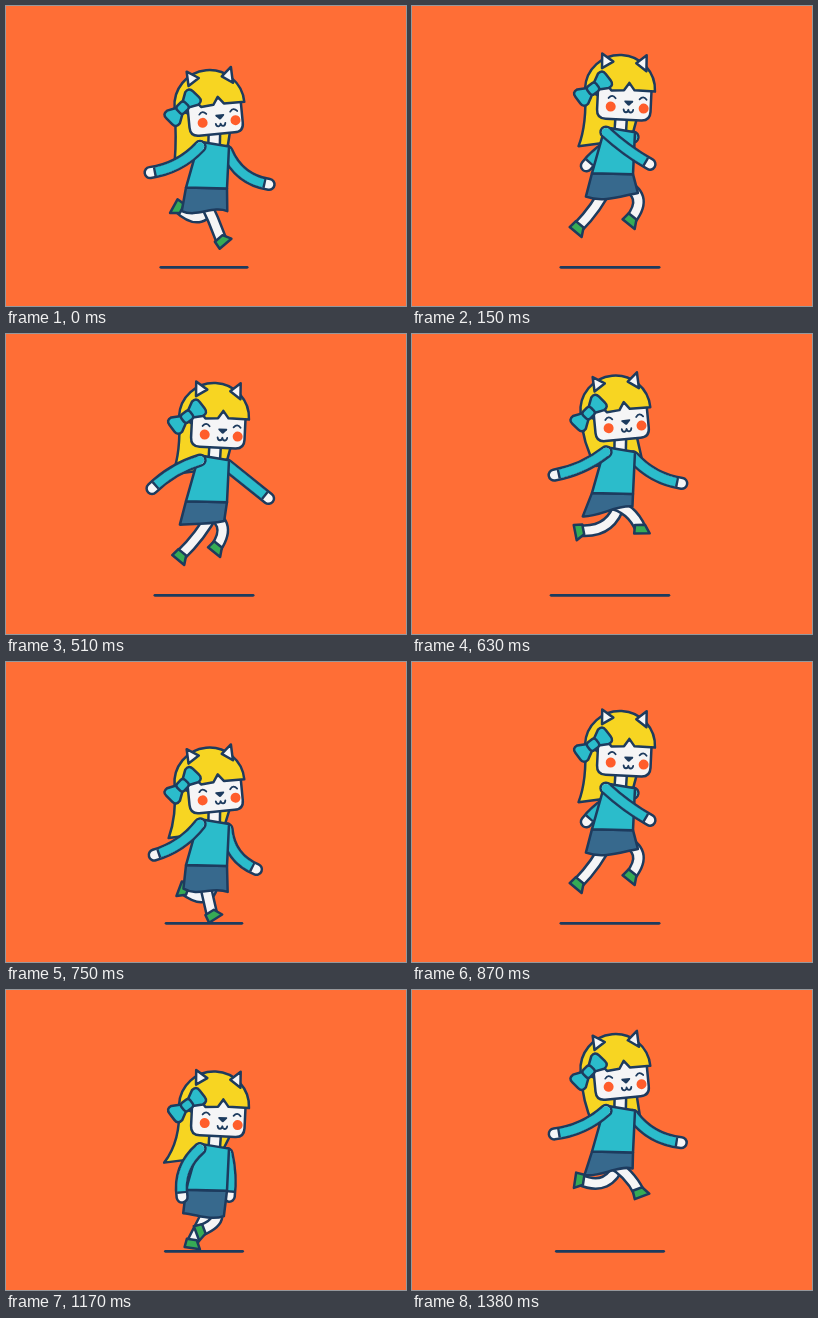
These frames come from a looping animation (400x300 px, 1440 ms). An HTML page:

```html
<!DOCTYPE html>
<html lang="en">
<head>
<meta charset="utf-8">
<title>Skipping</title>
<style>
html, body { margin: 0; width: 100%; height: 100%; overflow: hidden; background: #ff6e36; }
svg { display: block; width: 100vw; height: 100vh; }
.o { stroke: #1d3b5e; stroke-width: 2.5; stroke-linejoin: round; stroke-linecap: round; }
.n { fill: none; }
.y { fill: #f7d522; }
.t { fill: #2bbccb; }
.w { fill: #f5f5f6; }
.s { fill: #37698d; }
.g { fill: #36ab55; }
.c { fill: #ff5d2b; }
.d { fill: #1d3b5e; }
</style>
</head>
<body>
<svg viewBox="0 0 400 300">
  <rect width="400" height="300" fill="#ff6e36"/>
  <path id="ground" class="o n" style="stroke-width:2.8"/>
  <path id="hair" class="o y"/>
  <g id="armB"></g>
  <g id="legB"></g>
  <g id="legA"></g>
  <g id="neck"></g>
  <path id="skirt" class="o s"/>
  <path id="torso" class="o t"/>
  <g id="armA"></g>
  <g id="head">
    <path class="o w" d="M-26.5-38V-11.5Q-26.5-2.5-17.5-2.5H18Q27-2.5 27-11.5V-38Z"/>
    <path class="o y" d="M-39.5-32A35 35 0 0 1 30.5-32L10-32.3 4.5-39.5-.5-32-13-31-18-37-27-33Z"/>
    <path class="o w" d="M-24-67.5L-12.5-60-23.5-53ZM20.5-68L10.5-59.5 21-52Z"/>
    <g class="c"><circle cx="-13" cy="-15" r="5"/><circle cx="20" cy="-14.5" r="5"/></g>
    <path class="o n" style="stroke-width:1.8" d="M-15.5-23.5Q-12-28-8.5-23.5M15.5-23.5Q19-28 22.5-23.5M0-12.8Q.4-10 2.4-10T4.8-12.6Q5.2-10 7.2-10T9.6-12.8"/>
    <path class="d" d="M.8-21.8H8.8Q9.8-21.3 9-20.3L5.7-17Q4.8-16.4 3.9-17L.6-20.3Q-.2-21.3 .8-21.8Z"/>
    <g class="o t" transform="translate(-31.5 -32) rotate(-40)">
      <path d="M4-4L13-9Q19-10 19-4V4Q19 10 13 9L4 4ZM-4-4L-13-9Q-19-10-19-4V4Q-19 10-13 9L-4 4Z"/>
      <rect x="-5.5" y="-5" width="11" height="10" rx="3"/>
    </g>
  </g>
</svg>
<script>
const CYCLE = 720, HOP = 360, LOOP = 1440, STEP = 30, LAST = 1380;
const INK = '#1d3b5e', TEAL = '#2bbccb', WHITE = '#f5f5f6';
const X = 180;

const el = id => document.getElementById(id);
const cos = a => Math.cos(a * Math.PI / 180);
const sin = a => Math.sin(a * Math.PI / 180);
const mix = (p, q, u) => [p[0] + (q[0] - p[0]) * u, p[1] + (q[1] - p[1]) * u];
const ease = u => { u = Math.max(0, Math.min(1, u)); return u * u * (3 - 2 * u); };
const curve = (s, c, e) => `M${s}Q${c} ${e}`;
const line = (d, color, width, cap = 'round') =>
  `<path d="${d}" fill="none" stroke="${color}" stroke-width="${width}" stroke-linecap="${cap}"/>`;

// Control point beside the middle of s-e; positive bends clockwise of the limb.
function bent(s, e, bend) {
  const m = mix(s, e, .5), dx = e[0] - s[0], dy = e[1] - s[1], r = Math.hypot(dx, dy);
  return [m[0] - dy / r * bend, m[1] + dx / r * bend];
}

function arm(id, s, angle, length, bend) {
  const e = [s[0] + length * cos(angle), s[1] + length * sin(angle)];
  const c = bent(s, e, bend);
  const reach = 2 * Math.hypot(e[0] - c[0], e[1] - c[1]);
  const cut = px => {
    const u = 1 - px / reach, m = mix(s, c, u);
    return curve(s, m, mix(m, mix(c, e, u), u));
  };
  el(id).innerHTML =
    line(curve(s, c, e), INK, 13.4) +
    line(curve(s, c, e), WHITE, 8.4) +
    line(cut(3.6), INK, 9, 'butt') +
    line(cut(6), TEAL, 8.4, 'butt') +
    line(`M${s}h.01`, TEAL, 8.4);
}

// Both legs share one gait, half a cycle apart.
function leg(id, s, a, y, stride) {
  const fx = 194 + 36 * stride * cos(a - 307) + 4 * cos(2 * a - 270);
  const lift = 42.6 + 12.2 * cos(a - 28) + 8.3 * cos(2 * a - 136) + 6.2 * cos(3 * a);
  const fy = Math.min(253.5, y + lift);
  const toe = 39 - 65 * cos(a + 6) - 15 * cos(3 * a);
  const knee = 15.5 + 16 * cos(a - 208);
  const d = curve(s, bent(s, [fx, fy], -knee), [fx, fy]);
  el(id).innerHTML = line(d, INK, 13, 'butt') + line(d, WHITE, 8, 'butt') +
    `<path class="o g" d="M-5.5-4H4.5L9 4.5H-6.5Z" transform="translate(${fx} ${fy}) rotate(${toe})"/>`;
}

function draw(time) {
  const t = Math.min(Math.floor((time % LOOP) / STEP) * STEP, LAST) % CYCLE;
  const a = t / CYCLE * 360;      // whole stride, degrees
  const h = t / HOP * 360;        // single hop, degrees
  const gap = (t - 58 + HOP) % HOP;
  const air = Math.max(.14, Math.min(gap, HOP - gap) / (HOP / 2));
  const y = 158.5 + 74 * (1 - air) ** 3;
  const tilt = -5.5 + 8.2 * ease(cos(h - 125) / .8);
  const spot = (dx, dy) => [X + dx, y + dy];
  const hx = X + 31, hy = y - 51;
  const onHead = (px, py) =>
    [hx + px * cos(tilt) - py * sin(tilt), hy + px * sin(tilt) + py * cos(tilt)];

  const half = 33 + 31.5 * air;
  el('ground').setAttribute('d', `M${198 - half} 261.3H${198 + half}`);
  el('head').setAttribute('transform', `translate(${hx} ${hy}) rotate(${tilt})`);

  const sway = -cos(h - 80);
  const side = onHead(-39.5, -32), tip = spot(-9 + 13 * sway, -27);
  el('hair').setAttribute('d',
    `M${side}Q${side[0] + 2} ${tip[1] - 22} ${tip}L${spot(42 + 8 * sway, -34)}L${onHead(14, -6)}Z`);

  const swing = (phase, bias) => Math.tanh(2.2 * (cos(a + phase) + bias));
  const front = swing(48, .1), back = swing(52, -.1);
  arm('armB', spot(41, -36), 90 - 64 * back, 42 + 14 * Math.abs(back), 5 + 10 * cos(a - 15));

  const stride = 1 + .2 * sin(a);
  leg('legB', spot(28, 10), a + 180, y, stride);
  leg('legA', spot(17, 10), a, y, stride);

  const neck = `M${onHead(-2, -6)}L${spot(28, -38)}`;
  el('neck').innerHTML = line(neck, INK, 14, 'butt') + line(neck, WHITE, 9, 'butt');

  const [ax, ay] = spot(-1 - 10 * air, 23.5);
  const [bx, by] = spot(40 + 4 * air + 4 * sin(a), 30 - 20 * air);
  const third = (bx - ax) / 3, drop = (by - ay) / 3;
  const w1 = 4 + 4 * cos(a - 45), w2 = 2 - 8 * cos(a + 15);
  el('skirt').setAttribute('d',
    `M${spot(0, 0)}L${ax} ${ay}C${ax + third} ${ay + drop + w1} ` +
    `${bx - third} ${by - drop + w2} ${bx} ${by}L${spot(41, 1)}Z`);
  el('torso').setAttribute('d',
    `M${spot(13, -46)}L${spot(43, -41)}L${spot(41, 1)}L${spot(0, 0)}Z`);

  arm('armA', spot(14, -41), 88 + 69 * front, 51 + 6 * front * front, 5 - 15 * cos(a + 8));
}

let start = null;
function tick(now) {
  if (start === null) start = now;
  draw(Math.max(0, now - start));
  requestAnimationFrame(tick);
}
draw(0);
requestAnimationFrame(tick);
</script>
</body>
</html>
```
